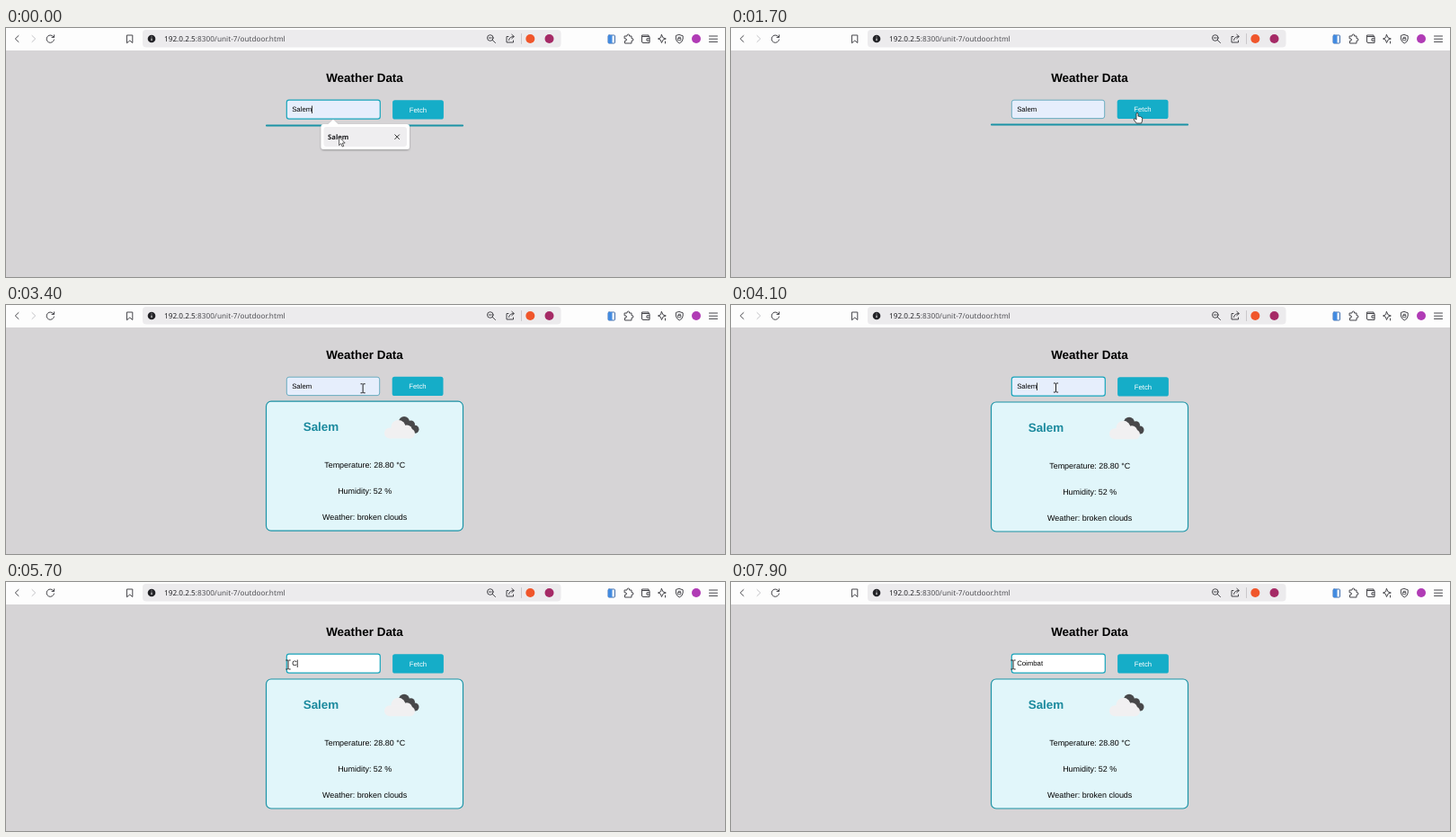
Recreate the animation shown at these times as an HTML page. Size 800 px wide and 277 px high, loop 8000 ms.

```html
<!DOCTYPE html>
<html lang="en">
<head>
<meta charset="utf-8">
<title>Weather Data</title>
<style>
  html, body { margin: 0; width: 100%; height: 100%; overflow: hidden; background: #d6d4d6; }
  svg { display: block; width: 800px; height: 277px; }
  text { font-family: "Liberation Sans", Arial, sans-serif; text-rendering: geometricPrecision; white-space: pre; }
  .ui { font-family: "Noto Sans", "Open Sans", sans-serif; }
  .head { font-size: 13.45px; font-weight: 700; }
  .field { font-size: 7.75px; }
  .facts { font-size: 8.95px; text-anchor: middle; }
  .icons { fill: none; stroke: #45454a; stroke-width: 1; stroke-linecap: round; stroke-linejoin: round; }
</style>
</head>
<body>
<svg viewBox="0 0 800 277">
  <defs>
    <clipPath id="selClip"><rect id="selClipBox" y="86" height="10"/></clipPath>
    <filter id="soft" x="-20%" y="-40%" width="140%" height="190%">
      <feDropShadow dx="0" dy="1" stdDeviation="1.3" flood-opacity=".3"/>
    </filter>
  </defs>
  <rect width="800" height="277" fill="#d6d4d6"/>

  <!-- browser bar -->
  <rect width="800" height="25" fill="#fdfdfd"/>
  <rect x="152" y="2" width="465.500" height="19.500" rx="4" fill="#ecebed"/>
  <g class="icons">
    <path d="M14 8.500L10.300 12L14 15.500"/>
    <path d="M29 8.500L32.700 12L29 15.500" stroke="#c4c4c7"/>
    <path d="M53 10A4.200 4.200 0 1 0 53.500 13M53.600 7.800V10.400H51"/>
    <path d="M134.800 8H140.800V16.500L137.800 14L134.800 16.500Z"/>
    <circle cx="538.800" cy="11" r="3.300"/><path d="M541.300 13.500L544.500 16.500M537.300 11H540.300"/>
    <path d="M559 9.500H557V16H564.500V14M559.500 13.500Q560 9.500 565 9.500M562.800 7.300L565.300 9.500L562.800 11.700"/>
    <path d="M573.500 6.500V17.500" stroke="#c9c7ca"/>
    <rect x="670" y="8" width="7.500" height="9" rx="1" stroke="#3f6dac"/>
    <rect x="670" y="8" width="4.500" height="9" fill="#438be0" stroke="none"/>
    <path d="M688.500 9H691Q690.700 7 692.300 7Q694 7 693.600 9H696V11.600Q698 11.300 698 13Q698 14.600 696 14.300V17H688.500V14.300Q690.500 14.500 690.500 13Q690.500 11.500 688.500 11.700Z"/>
    <path d="M715 9.500V8H707.500V15Q707.500 16.500 709 16.500H716V9.500H708.500M716 11.800H713V14.200H716"/>
    <path d="M729.500 7.500L731 10.800L734.300 12L731 13.200L729.500 16.500L728.300 13.200L725.500 12L728.300 10.800ZM733.500 15V17"/>
    <path d="M749.300 7.500L753.200 8.800V12Q753 15.300 749.300 17Q745.600 15.300 745.400 12V8.800Z"/>
    <path d="M747.800 11.500H750.800V13.700H747.800ZM748.200 11.500V10.200H750.400V11.500" stroke-width=".8"/>
    <path d="M782.500 9H791.500M782.500 12.200H791.500M782.500 15.400H791.500"/>
  </g>
  <circle cx="162" cy="12" r="4.300" fill="#222226"/>
  <path d="M162 11.500V14.200M162 9.600V10.300" stroke="#fff"/>
  <circle cx="583.300" cy="12" r="5" fill="#f0562b"/>
  <circle cx="604.500" cy="12" r="5" fill="#a52a66"/>
  <circle cx="768" cy="12" r="5" fill="#b03bb5"/>
  <text class="ui" x="176" y="15" font-size="8.220" fill="#242428">192.0.2.5<tspan fill="#505055">:8300/unit-7/outdoor.html</tspan></text>

  <!-- page -->
  <text class="head" x="399" y="60" text-anchor="middle">Weather Data</text>
  <rect id="box" x="312.300" y="80.200" rx="2.600"/>
  <text class="field" id="value" x="318.200" y="93.400"></text>
  <rect id="sel" y="86" height="9.800" fill="#3465b8"/>
  <text class="field" id="picked" x="318.200" y="93.400" fill="#fff" clip-path="url(#selClip)"></text>
  <rect id="caret" y="86.500" width=".8" height="8.500" fill="#111"/>
  <g id="button">
    <rect x="429.700" y="79.700" width="56.800" height="21.300" rx="2.600" fill="#15adc8"/>
    <text class="field" x="458" y="93.200" text-anchor="middle" fill="#fff">Fetch</text>
  </g>
  <g id="result">
    <rect id="card" x="289.500" y="107.200" width="219" rx="5.500" fill="#e1f6fa" stroke="#1b93a6" stroke-width="1.200"/>
    <g id="details">
      <text class="head" x="330.700" y="140" fill="#1b8a9e">Salem</text>
      <g fill="#48484a">
        <circle cx="443" cy="130" r="6"/><circle cx="450.500" cy="133" r="4.500"/>
        <circle cx="455" cy="138.200" r="4.500"/><path d="M443 130H452L455 142.700H443Z"/>
      </g>
      <g fill="#f1f0f1">
        <circle cx="436.500" cy="136" r="8"/><circle cx="446" cy="139.500" r="6"/>
        <circle cx="427" cy="142.500" r="6"/><circle cx="449.500" cy="143" r="5.500"/>
        <path d="M427 137H449V148.500H427Z"/>
      </g>
      <g class="facts">
        <text x="399.200" y="181">Temperature: 28.80 °C</text>
        <text x="399.200" y="210">Humidity: 52 %</text>
        <text x="399.200" y="239.300">Weather: broken clouds</text>
      </g>
    </g>
  </g>

  <g id="menu">
    <path filter="url(#soft)" fill="#fff" d="M353 107H358.500L364 101.800L369.500 107H446Q449 107 449 110V132Q449 135 446 135H353.500Q350.500 135 350.500 132V110Q350.500 107 353 107Z"/>
    <rect x="353.500" y="110" width="92.500" height="22" rx="3" fill="#efeef0"/>
    <text class="ui" x="358" y="124" font-size="7.700" font-weight="600" fill="#1d1d20">Salem</text>
    <path d="M432.500 118.500L437.800 123.800M437.800 118.500L432.500 123.800" stroke="#333"/>
  </g>

  <!-- pointers, hot spot at 0,0 -->
  <path id="arrow" fill="#fff" stroke="#222" stroke-width=".7" d="M0 0V9.500L2.200 7.500L3.700 11L5.200 10.300L3.700 7H6.600Z"/>
  <path id="hand" fill="#fff" stroke="#222" stroke-width=".8" stroke-linejoin="round" d="M-1 1Q0 -.7 1 1V4.300Q2 3.600 2.700 4.700Q3.700 4.200 4.200 5.200Q5.600 5 5.600 6.500V9L4.600 12H-.8L-3.800 8Q-4 6.600 -2.600 6.800L-1 8Z"/>
  <path id="beam" fill="none" stroke="#222" stroke-width="1" d="M-2.600 -5H-.6L0 -4.400L.6 -5H2.600M-2.600 5H-.6L0 4.400L.6 5H2.600M0 -4.400V4.400"/>
</svg>
<script>
  const $ = id => document.getElementById(id);
  const LOOP = 8000, PICK = 400, BLUR = 1300, LOADED = 1800, FOCUS = 3900, DRAG = 4300;
  const TEXT_X = 318.2, CITY = 'Salem', TYPED = 'Coimbat';
  const keyTimes = [5500, 5750, 6050, 6300, 6750, 7000, 7300];
  const caretResets = [0, FOCUS, ...keyTimes];
  // time, x, y of the pointer
  const path = [
    [0, 370.6, 121], [500, 370.6, 121], [1200, 452, 94], [3000, 452, 94],
    [3700, 361.5, 92], [DRAG, 361.5, 92], [4800, 314, 92], [LOOP, 314, 92]
  ];

  const set = (id, attrs) => {
    for (const key in attrs) $(id).setAttribute(key, attrs[key]);
  };
  const show = (id, on) => set(id, { visibility: on ? 'visible' : 'hidden' });
  const within = (x, y, left, right) => x > left && x < right && y > 80 && y < 101.5;

  function pointerAt(t) {
    const i = path.findIndex(p => p[0] > t);
    const [t0, x0, y0] = path[i - 1], [t1, x1, y1] = path[i];
    const u = (t - t0) / (t1 - t0), e = u * u * (3 - 2 * u);
    return [x0 + (x1 - x0) * e, y0 + (y1 - y0) * e];
  }

  function draw(t) {
    const focused = t < BLUR || t >= FOCUS;
    const typed = keyTimes.filter(k => k <= t).length;
    const value = typed ? TYPED.slice(0, typed) : CITY;
    const shift = `translate(0 ${focused ? 0.8 : 0})`;
    const [x, y] = pointerAt(t);

    $('value').textContent = $('picked').textContent = value;
    const edge = n => TEXT_X + (n ? $('value').getSubStringLength(0, n) : 0);
    const end = edge(value.length);

    // dragging left selects whole letters from the end
    const selecting = t >= DRAG && !typed;
    let start = value.length;
    while (selecting && start && x < (edge(start) + edge(start - 1)) / 2) start--;
    const range = { x: edge(start), width: end - edge(start) };
    set('sel', range);
    set('selClipBox', range);

    set('box', {
      width: focused ? 104 : 103.4, height: focused ? 21 : 20.4,
      fill: typed ? '#fff' : '#e6eefc',
      stroke: focused ? '#18a5bc' : '#4d9fb6',
      'stroke-width': focused ? 1.2 : 0.8
    });
    const lastReset = caretResets.filter(k => k <= t).pop();
    set('caret', { x: end });
    show('caret', focused && start === value.length && (t - lastReset) % 1000 < 500);

    set('button', { transform: `translate(${focused ? 0.4 : 0} ${focused ? 0.5 : 0})` });
    set('result', { transform: shift });
    set('card', { height: t < LOADED ? 0.8 : 144, rx: t < LOADED ? 0.4 : 5.5 });
    show('details', t >= LOADED);
    show('menu', t < PICK);

    const inField = t >= PICK && within(x, y, 312, 416.5);
    const kind = within(x, y, 429.5, 487) ? 'hand' : inField ? 'beam' : 'arrow';
    for (const id of ['arrow', 'hand', 'beam']) show(id, id === kind);
    set(kind, { transform: `translate(${x} ${y})` });
  }

  function frame() {
    draw(Math.floor(performance.now() % LOOP / 100) * 100);
    requestAnimationFrame(frame);
  }
  frame();
</script>
</body>
</html>
```
